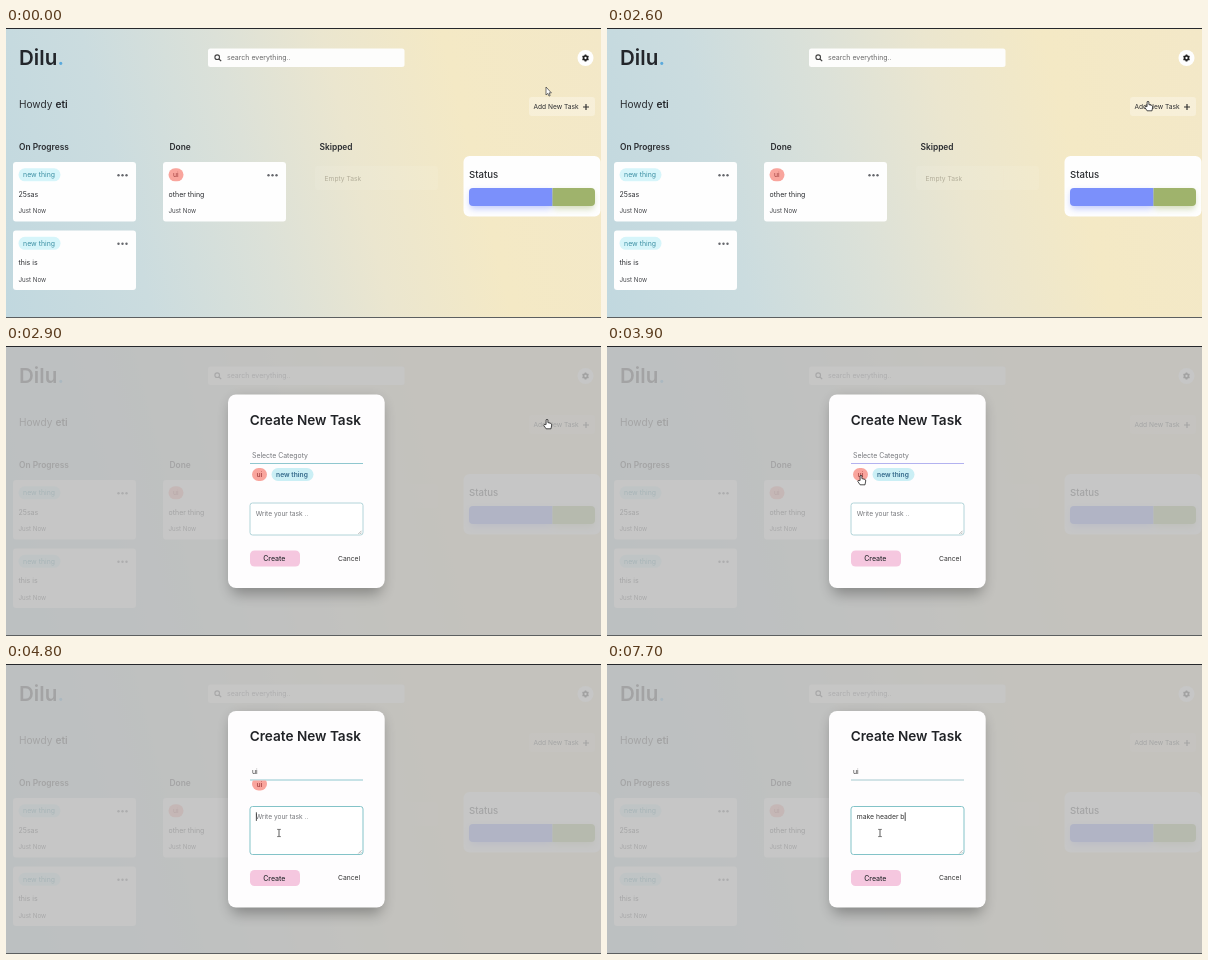
An HTML page that plays this animation: 595 by 290 pixels, repeating every 8000 ms.

```html
<!DOCTYPE html>
<html lang="en">
<head>
<meta charset="utf-8">
<title>Task board</title>
<style>
  html, body { margin: 0; width: 100%; height: 100%; overflow: hidden; }
  #stage {
    position: relative; width: 595px; height: 290px; overflow: hidden;
    background: linear-gradient(76deg, #c1d8df 0%, #cbdcdf 22%, #dce1d8 42%, #ebe6cf 58%, #f4e9c5 76%, #f3e8c8 100%);
  }
  svg { position: absolute; left: 0; top: 0; display: block; }
  text { font-family: Inter, Roboto, "Open Sans", sans-serif; white-space: pre; }
</style>
</head>
<body>
<div id="stage">
  <svg id="svg" width="595" height="290" viewBox="0 0 595 290">
    <defs>
      <filter id="glow" x="-20%" y="-80%" width="140%" height="260%"><feGaussianBlur stdDeviation="3"/></filter>
      <filter id="shade" x="-20%" y="-20%" width="140%" height="140%"><feGaussianBlur stdDeviation="7"/></filter>
      <clipPath id="bar"><rect x="463" y="160" width="126" height="18" rx="4"/></clipPath>
      <clipPath id="slot"><rect x="222" y="69.5" width="157" height="60"/></clipPath>
    </defs>
    <g id="page"></g>
    <g id="overlay">
      <rect width="595" height="290" fill="#bbbbbb" fill-opacity=".84"/>
      <g id="modal"></g>
    </g>
    <rect width="595" height="1" fill="#25272b"/>
    <rect y="289" width="595" height="1" fill="#5c5f60"/>
    <g id="cursor">
      <path id="arrow" d="M0 0V8L1.8 6.4L3 9.1L4.2 8.5L3 5.9H5.4Z" fill="#fff" stroke="#333" stroke-width=".7"/>
      <path id="hand" d="M-.9 5.5V.8Q0-.4 .9 .8V3.6L4 4.4Q4.9 4.8 4.7 6L4 9.8H-.9L-3.2 6.4Q-3.2 5-1.9 5.6Z" fill="#fff" stroke="#222" stroke-width=".8"/>
      <path id="beam" d="M-1.7-3.6H-.4L0-3.2L.4-3.6H1.7M0-3.2V3.2M-1.7 3.6H-.4L0 3.2L.4 3.6H1.7" fill="none" stroke="#333" stroke-width=".8"/>
    </g>
  </svg>
</div>
<script>
const LOOP = 8000, STEP = 100;
const $ = id => document.getElementById(id);

function add(parent, tag, attrs) {
  const el = document.createElementNS("http://www.w3.org/2000/svg", tag);
  for (const k in attrs) el.setAttribute(k, attrs[k]);
  parent.append(el);
  return el;
}
const group = (parent, attrs = {}) => add(parent, "g", attrs);
const box = (parent, x, y, width, height, rx, fill, more) =>
  add(parent, "rect", { x, y, width, height, rx, fill, ...more });
const path = (parent, d, stroke, width = 1, fill = "none") =>
  add(parent, "path", { d, stroke, "stroke-width": width, fill });
// cy is the middle of the capital letters
function label(parent, str, x, cy, size, fill = "#2b2d31", weight = 400) {
  const el = add(parent, "text", { x, y: cy + size * .36, "font-size": size, "font-weight": weight, fill });
  el.textContent = str;
  return el;
}
const show = (el, on) => el.setAttribute("visibility", on ? "inherit" : "hidden");
const shift = (el, x, y) => el.setAttribute("transform", `translate(${x} ${y})`);

// linear reading of a table of [time, value, value...]
function at(keys, t) {
  let i = keys.findIndex(k => k[0] > t);
  if (i < 0) return keys[keys.length - 1].slice(1);
  if (i === 0) return keys[0].slice(1);
  const a = keys[i - 1], b = keys[i], f = (t - a[0]) / (b[0] - a[0]);
  return a.slice(1).map((v, n) => v + (b[n + 1] - v) * f);
}

const page = $("page");

function chip(parent, kind, x, y, weight = 400) {
  if (kind === "ui") {
    box(parent, x, y, 15, 13, 6.5, "#f9a59d");
    label(parent, "ui", x + 4.6, y + 6.6, 6.8, "#a03e3e", weight);
  } else {
    box(parent, x, y, 42, 13, 6.5, weight > 400 ? "#cbeff5" : "#d6f5fa");
    label(parent, "new thing", x + 4.6, y + 6.6, weight > 400 ? 6.7 : 6.9, weight > 400 ? "#34698a" : "#3c8fa3", weight);
  }
}

function card(x, y, kind, title) {
  box(page, x, y, 123, 59.5, 3, "#fefefe");
  chip(page, kind, x + 5.5, y + 6.3);
  for (const d of [105.5, 109.5, 113.5])
    add(page, "circle", { cx: x + d, cy: y + 13.3, r: 1.2, fill: "#65676c" });
  label(page, title, x + 5.5, y + 32, 7);
  label(page, "Just Now", x + 5.5, y + 49, 6.2, "#46484c");
}

function buildPage() {
  label(page, "Dilu", 13, 30, 20.6, "#23262b", 600);
  label(page, ".", 51.4, 30, 20.6, "#5aa9dc", 600);

  box(page, 202, 20.5, 196.5, 18.5, 2.5, "#fdfdfc");
  add(page, "circle", { cx: 211.2, cy: 29.2, r: 2.3, fill: "none", stroke: "#444", "stroke-width": 1.1 });
  path(page, "M213 31L215.2 33.2", "#444", 1.2);
  label(page, "search everything..", 221, 29.8, 7, "#6a6a6a");

  add(page, "circle", { cx: 579.5, cy: 30, r: 8, fill: "#fefefe" });
  for (let a = 0; a < 180; a += 60)
    box(page, 578.5, 26.5, 2, 7, .5, "#222", { transform: `rotate(${a} 579.5 30)` });
  add(page, "circle", { cx: 579.5, cy: 30, r: 1.9, fill: "#fefefe", stroke: "#222", "stroke-width": 1.5 });

  label(page, "Howdy", 13, 76, 10.1);
  label(page, "eti", 49.5, 76, 10.1, "#222428", 600);

  box(page, 523, 69, 66, 19, 3, "#fff", { "fill-opacity": .3 });
  label(page, "Add New Task", 527.5, 79, 6.6, "#2a2b2e");
  path(page, "M577 79H583M580 76V82", "#333", 1.2);

  label(page, "On Progress", 13, 118.5, 8.4, "#2b2d31", 600);
  label(page, "Done", 163.5, 118.5, 8.4, "#2b2d31", 600);
  label(page, "Skipped", 313.5, 118.5, 8.4, "#2b2d31", 600);
  card(7, 134, "new", "25sas");
  card(7, 202.5, "new", "this is");
  card(157, 134, "ui", "other thing");
  box(page, 309, 138, 123, 24, 3, "#fff", { "fill-opacity": .07 });
  label(page, "Empty Task", 318.5, 150.2, 6.7, "#b3ae9a");

  box(page, 457.5, 128, 137, 60.5, 6, "#fefefe");
  label(page, "Status", 463, 146.5, 9.6, "#2b2d31", 500);
  const glow = group(page, { filter: "url(#glow)", opacity: .45 });
  box(glow, 464, 163, 82, 18, 4, "#7b90fb");
  box(glow, 546, 163, 42, 18, 4, "#9fb36c");
  const bar = group(page, { "clip-path": "url(#bar)" });
  box(bar, 463, 160, 83.5, 18, 0, "#7b90fb");
  box(bar, 546.5, 160, 43, 18, 0, "#9fb36c");
}

// The dialog is built with its top edge at y = 0.
const modal = $("modal");
const ui = {};

function buildModal() {
  ui.shade = box(modal, 225, 6, 151, 190, 8, "#000", { filter: "url(#shade)", opacity: .3 });
  ui.panel = box(modal, 222, 0, 156.7, 194, 8, "#fefdfe");
  label(modal, "Create New Task", 243.7, 25.3, 13.6, "#212327", 600);
  ui.pick = label(modal, "Selecte Categoty", 246, 60.8, 6.9, "#75777b");
  ui.picked = label(modal, "ui", 246, 60.8, 6.9, "#333");
  ui.line = path(modal, "M244 69H357", "#8fc3c9");
  const slot = group(modal, { "clip-path": "url(#slot)" });
  ui.chip = group(slot);
  chip(ui.chip, "ui", 246, 73.5, 500);
  ui.other = group(slot);
  chip(ui.other, "new", 265.5, 73.5, 600);

  ui.area = group(modal);
  ui.field = box(ui.area, 244, .5, 113, 32, 2.5, "#fff", { "stroke-width": 1 });
  ui.grip = path(ui.area, "M352.3 -1.5L355.5 -4.7M354.2 -1.5L355.5 -2.8", "#888", .6);
  ui.hint = label(ui.area, "Write your task ..", 249.7, 10.8, 6.6, "#75777b");
  ui.typed = label(ui.area, "", 249.7, 10.8, 6.8, "#333");
  ui.caret = box(ui.area, 250, 6.3, .8, 8.6, 0, "#222");

  ui.foot = group(modal);
  box(ui.foot, 244, 0, 50, 16, 4.5, "#f5c7df");
  label(ui.foot, "Create", 257.2, 8, 7, "#2b2d31", 500);
  label(ui.foot, "Cancel", 332, 8, 6.75, "#333");
}

const MESSAGE = "make header b";
const KEY_TIMES = [5200, 5400, 5600, 5700, 6400, 6500, 6600, 6700, 6800, 7000, 7100, 7400, 7700];
const FADE = [[2700, 0], [2800, .26], [2900, 1]];
const SLOT = [[4000, 39], [4100, 36], [4300, 28], [4500, 26]];
const FIELD = [[4400, 32], [4500, 36], [4700, 46], [4800, 48]];
const CHIP = [[4400, 0], [4700, -7]];
const MOUSE = [
  [1200, 540, 59], [1700, 541, 73], [2900, 541, 73], [3300, 330, 106],
  [3600, 267, 142], [3900, 254, 129], [4000, 254, 129], [4300, 272, 156], [4700, 273, 169]
];

function pointer(t) {
  if (t >= 4200) return "beam";
  if (t >= 1600 && t < 3000 || t >= 3700) return "hand";
  return "arrow";
}

function render(t) {
  const [slot] = at(SLOT, t), [field] = at(FIELD, t), [alpha] = at(FADE, t);
  const height = 122.5 + slot + field;
  const picked = t >= 4100, focused = t >= 4500;
  const count = KEY_TIMES.filter(k => k <= t).length;

  $("overlay").setAttribute("opacity", alpha);
  shift(modal, 0, 145.25 - height / 2);
  ui.panel.setAttribute("height", height);
  ui.shade.setAttribute("height", height);
  show(ui.pick, !picked);
  show(ui.picked, picked);
  show(ui.other, !picked);
  show(ui.chip, t < 5800);
  shift(ui.chip, 0, at(CHIP, t)[0]);
  ui.line.setAttribute("stroke", t >= 3500 && t < 4500 ? "#b3b2f0" : t >= 5900 ? "#a5c9cf" : "#8fc7cf");

  shift(ui.area, 0, 69 + slot);
  ui.field.setAttribute("height", field);
  ui.field.setAttribute("stroke", focused ? "#83c3c8" : "#b2d4d9");
  shift(ui.grip, 0, field + 1);
  show(ui.hint, count === 0);
  ui.typed.textContent = MESSAGE.slice(0, count);
  show(ui.caret, focused);
  ui.caret.setAttribute("x", 249.9 + (count ? ui.typed.getComputedTextLength() : 0));
  shift(ui.foot, 0, 85 + slot + field);

  shift($("cursor"), ...at(MOUSE, t));
  for (const id of ["arrow", "hand", "beam"]) show($(id), id === pointer(t));
}

buildPage();
buildModal();
const start = performance.now();
function tick() {
  const t = (performance.now() - start) % LOOP;
  render(Math.floor(t / STEP) * STEP);
  requestAnimationFrame(tick);
}
tick();
</script>
</body>
</html>
```
